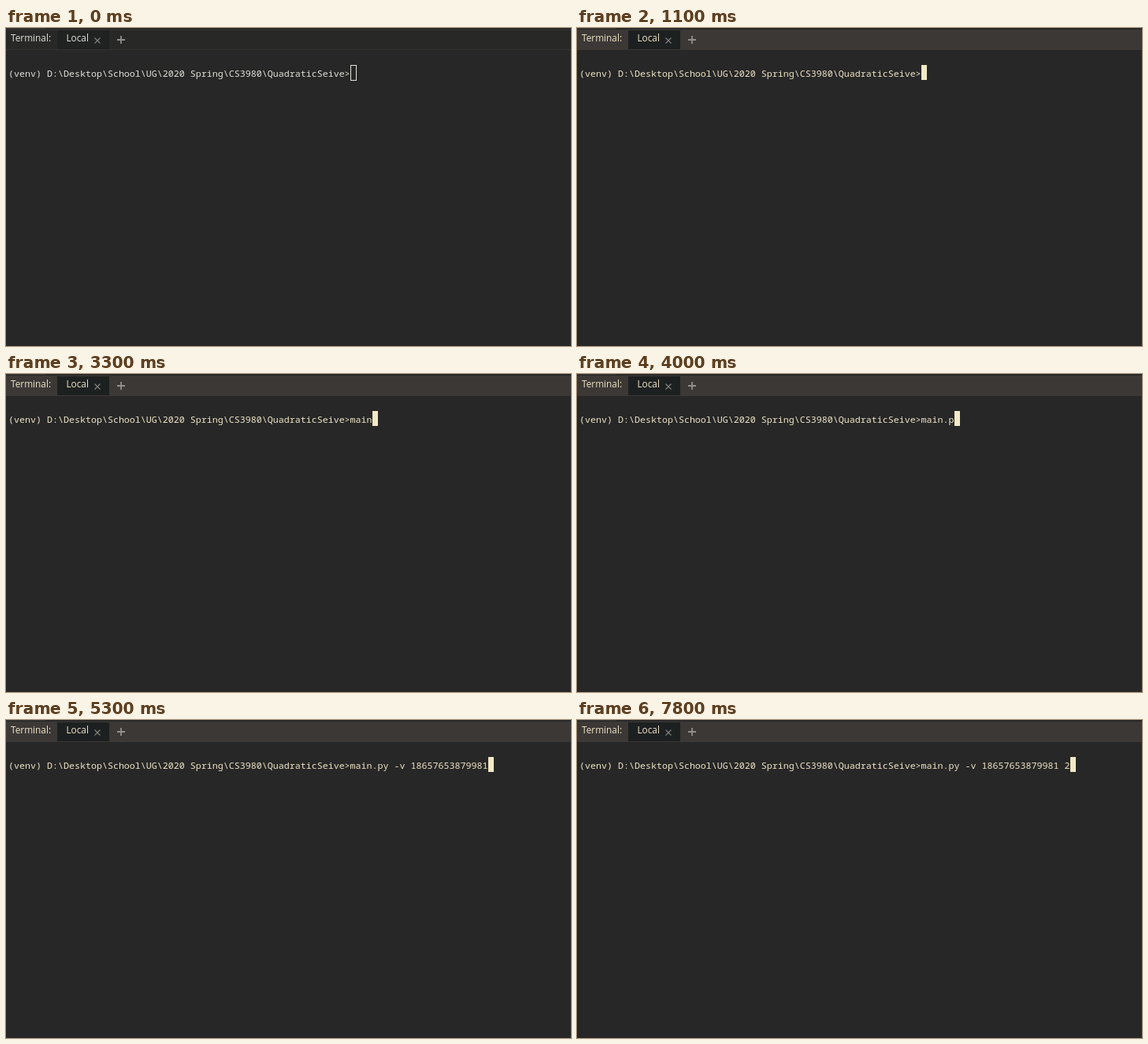
An HTML page with a canvas that plays this animation: 717x404 px, repeating every 8000 ms.

```html
<!DOCTYPE html>
<html lang="en">
<head>
<meta charset="utf-8">
<title>Terminal</title>
<style>
html, body { margin: 0; width: 100%; height: 100%; overflow: hidden; background: #272727; }
canvas { display: block; }
</style>
</head>
<body>
<canvas id="stage" width="717" height="404"></canvas>
<script>
const ctx = document.getElementById("stage").getContext("2d");
const LOOP = 8000, FOCUS = 1100;
const LEFT = 3, ADVANCE = 7;
const MONO = '11.667px "Noto Sans Mono", "DejaVu Sans Mono", monospace';
const UI = '11.8px "Open Sans", "Noto Sans", sans-serif';
const PROMPT = "(venv) D:\\Desktop\\School\\UG\\2020 Spring\\CS3980\\QuadraticSeive>";

// [time, text typed at that time]
const keys = [
  [2900, "m"], [3000, "a"], [3100, "i"], [3300, "n"], [3600, "."],
  [4000, "p"], [4100, "y"], [4200, " "], [4400, "-"], [4600, "v"], [4800, " "],
  [5300, "18657653879981"], [6100, " "], [7700, "2"]
];
// spans in which the blinking cursor is hidden
const hidden = [[1600, 2100], [2600, 2900], [5800, 6100], [7100, 7700]];

function rect(color, x, y, w, h) {
  ctx.fillStyle = color;
  ctx.fillRect(x, y, w, h);
}

function text(str, x, y, font, color) {
  ctx.font = font;
  ctx.fillStyle = color;
  ctx.fillText(str, x, y);
}

function line(color, width, ...points) {
  ctx.strokeStyle = color;
  ctx.lineWidth = width;
  ctx.beginPath();
  for (const [x1, y1, x2, y2] of points) {
    ctx.moveTo(x1, y1);
    ctx.lineTo(x2, y2);
  }
  ctx.stroke();
}

function mix(a, b, k) {
  return "rgb(" + a.map((v, i) => Math.round(v + (b[i] - v) * k)).join(",") + ")";
}

function drawHeader(focused, ink) {
  rect(focused ? "#3c3836" : "#282827", 0, 0, 717, 28);
  rect("#292828", 0, 0, 717, 2);
  rect("#393634", 0, 0, 50, 1);
  if (!focused) {
    rect("#333130", 0, 2, 717, 1);
    rect("#363433", 0, 27, 717, 1);
  }
  rect(focused ? "#1d2020" : "#202121", 65, 3, 66, 24);
  if (focused) rect("#1d2020", 65, 26, 66, 1);
  text("Terminal:", 6, 17, UI, ink);
  text("Local", 76.5, 17, UI, ink);
  line("#858481", 1.1, [112.5, 12.5, 119.5, 19.5], [119.5, 12.5, 112.5, 19.5]);
  line("#92908c", 1.8, [141, 15, 151, 15], [146, 10, 146, 20]);
}

function drawCursor(t, x, focused, ink) {
  if (!focused) {
    ctx.strokeStyle = ink;
    ctx.lineWidth = 1;
    ctx.strokeRect(x + 0.5, 47.5, 7, 19);
  } else if (!hidden.some(([from, to]) => t >= from && t < to)) {
    rect("#f4e9c6", x, 47, 7, 19);
  }
}

function draw(t) {
  const focused = t >= FOCUS;
  const warm = Math.min(1, Math.floor(t / 100) / 8);
  const ink = mix([226, 226, 218], [240, 229, 199], warm);
  rect("#272727", 0, 0, 717, 404);
  drawHeader(focused, ink);
  rect("#333231", 716, 28, 1, 376);

  const typed = keys.filter(k => t >= k[0]).map(k => k[1]).join("");
  const row = PROMPT + typed;
  text(row, LEFT, 62, MONO, ink);
  drawCursor(t, LEFT + row.length * ADVANCE, focused, ink);
}

const start = performance.now();
function tick() {
  draw((performance.now() - start) % LOOP);
  requestAnimationFrame(tick);
}
tick();
</script>
</body>
</html>
```
